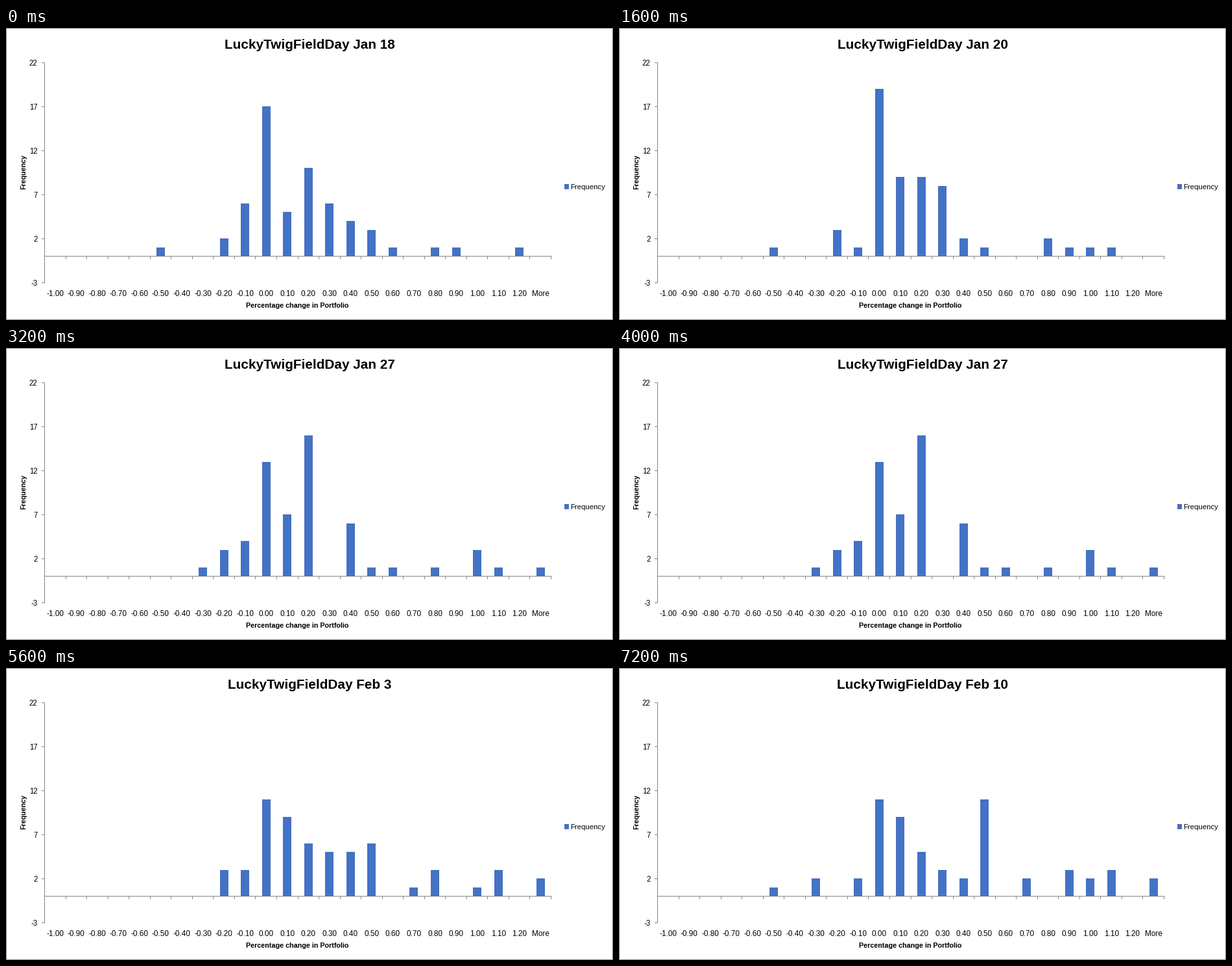
Write a matplotlib script that moves like this. It is 936 px wide and 451 px high and loops after 8000 ms.

```python
import matplotlib.pyplot as plt
from matplotlib.animation import FuncAnimation
from matplotlib.patches import Rectangle

W, H, DPI = 936, 451, 64
BLUE, GREY = "#4472c4", "#868686"
LEFT, RIGHT, TOP, BOTTOM = 59, 840, 53, 393
ZERO, UNIT = 352, 13.6          # baseline row, pixels per count
SLOTS = 24
STEP = (RIGHT - LEFT) / SLOTS
BAR_W = 13
FIRST = 5                       # slot of the first stored count (-0.50)
NAME = "LuckyTwigFieldDay"

DAYS = [
    ("Jan 18", [1, 0, 0, 2, 6, 17, 5, 10, 6, 4, 3, 1, 0, 1, 1, 0, 0, 1, 0]),
    ("Jan 20", [1, 0, 0, 3, 1, 19, 9, 9, 8, 2, 1, 0, 0, 2, 1, 1, 1, 0, 0]),
    ("Jan 27", [0, 0, 1, 3, 4, 13, 7, 16, 0, 6, 1, 1, 0, 1, 0, 3, 1, 0, 1]),
    ("Feb 3", [0, 0, 0, 3, 3, 11, 9, 6, 5, 5, 6, 0, 1, 3, 0, 1, 3, 0, 2]),
    ("Feb 10", [1, 0, 2, 0, 2, 11, 9, 5, 3, 2, 11, 0, 2, 0, 3, 2, 3, 0, 2]),
]
HOLD = 2                        # frames per day

plt.rcParams["font.family"] = "Liberation Sans"
fig = plt.figure(figsize=(W / DPI, H / DPI), dpi=DPI, facecolor="white")
ax = fig.add_axes([0, 0, 1, 1])
ax.set_xlim(0, W)
ax.set_ylim(H, 0)
ax.axis("off")


def box(x, y, w, h, color, z=1):
    return ax.add_patch(Rectangle((x, y), w, h, fc=color, lw=0,
                                  antialiased=False, zorder=z))


def label(x, y, s, px, ha="center", **kw):
    return ax.text(x, y, s, fontsize=px * 72 / DPI, ha=ha, va="baseline",
                   color="black", **kw)


# Outer border
box(0, 0, W, 1, GREY)
box(0, H - 1, W, 1, GREY)
box(0, 0, 1, H, GREY)
box(W - 1, 0, 1, H, GREY)

# Axes, ticks and tick labels
box(LEFT, TOP, 1, BOTTOM - TOP + 1, GREY, 3)
box(LEFT, ZERO, RIGHT - LEFT + 1, 1, GREY, 3)
for i, value in enumerate(range(22, -4, -5)):
    y = TOP + 68 * i
    box(LEFT - 4, y, 4, 1, GREY, 3)
    label(48.5, y + 4.5, str(value), 11.5, ha="right")
for i in range(SLOTS + 1):
    box(round(LEFT + i * STEP), ZERO, 1, 5, GREY, 3)
for i in range(SLOTS):
    text = "More" if i == SLOTS - 1 else f"{(i - 10) / 10:.2f}"
    label(LEFT + 0.5 + (i + 0.5) * STEP, 414, text, 11.7)

# Axis titles and legend
label(449, 432.5, "Percentage change in Portfolio", 10.75, weight="bold")
label(30, 222.5, "Frequency", 10.6, weight="bold", rotation=90,
      rotation_mode="anchor")
box(861, 241, 7, 8, BLUE)
label(870, 249, "Frequency", 11.4, ha="left")

title = label(468.5, 32, "", 20.8, weight="bold")
bars = [box(round(LEFT + 0.5 + (FIRST + k + 0.5) * STEP - BAR_W / 2),
            ZERO, BAR_W, 0, BLUE, 2) for k in range(SLOTS - FIRST)]


def draw(frame):
    day, counts = DAYS[frame // HOLD]
    title.set_text(f"{NAME} {day}")
    for bar, n in zip(bars, counts):
        top = round(ZERO + 0.5 - UNIT * n) if n else ZERO
        bar.set_y(top)
        bar.set_height(ZERO - top)
        bar.set_visible(n > 0)
    return [title, *bars]


anim = FuncAnimation(fig, draw, frames=HOLD * len(DAYS), interval=800,
                     init_func=lambda: draw(0), repeat=True, repeat_delay=0,
                     blit=False)
plt.show()
```
